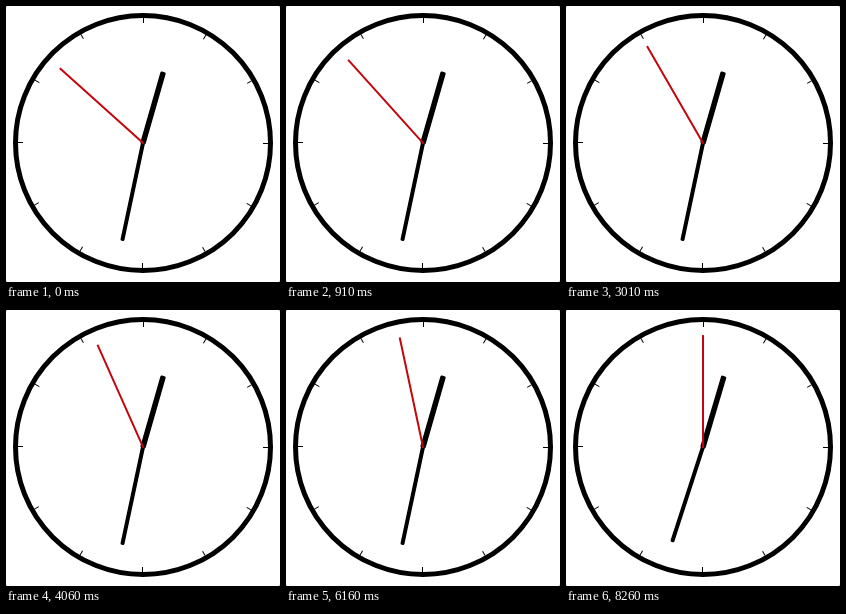
Recreate the animation shown at these times as an HTML page. Size 274 by 276 pixels, loop 9170 ms.

```html
<!DOCTYPE html>
<html lang="en">
<head>
<meta charset="utf-8">
<title>Clock</title>
<style>
  html, body { margin: 0; width: 100%; height: 100%; overflow: hidden; background: #999; }
  svg { display: block; width: 274px; height: 276px; background: #fff; border-radius: 2px; }
</style>
</head>
<body>
<svg viewBox="0 0 274 276">
  <g transform="translate(137 137)">
    <circle r="127.5" fill="none" stroke="#000" stroke-width="5"/>
    <g id="ticks"></g>
    <rect id="hour" x="-2.75" y="-74" width="5.5" height="75" rx="1.5"/>
    <rect id="minute" x="-2" y="-100" width="4" height="101" rx="1.5"/>
    <rect id="second" x="-1" y="-112" width="2" height="113" rx=".5" fill="#c4060c"/>
  </g>
</svg>
<script>
const LOOP = 9170, STEP = 1050, LEAD = 140;
const START = (12 * 60 + 32) * 60 + 52; // 12:32:52
const $ = id => document.getElementById(id);
const turn = (id, deg) => $(id).setAttribute('transform', `rotate(${deg})`);

for (let i = 0; i < 12; i++) {
  $('ticks').innerHTML += `<rect y="-125" width="1" height="5" transform="rotate(${i * 30})"/>`;
}

function draw(now) {
  const time = START + Math.floor((now % LOOP + LEAD) / STEP);
  const minutes = Math.floor(time / 60);
  turn('hour', minutes / 2 % 360);
  turn('minute', minutes % 60 * 6);
  turn('second', time % 60 * 6);
}

const begin = performance.now();
function frame() {
  draw(performance.now() - begin);
  requestAnimationFrame(frame);
}
frame();
</script>
</body>
</html>
```
